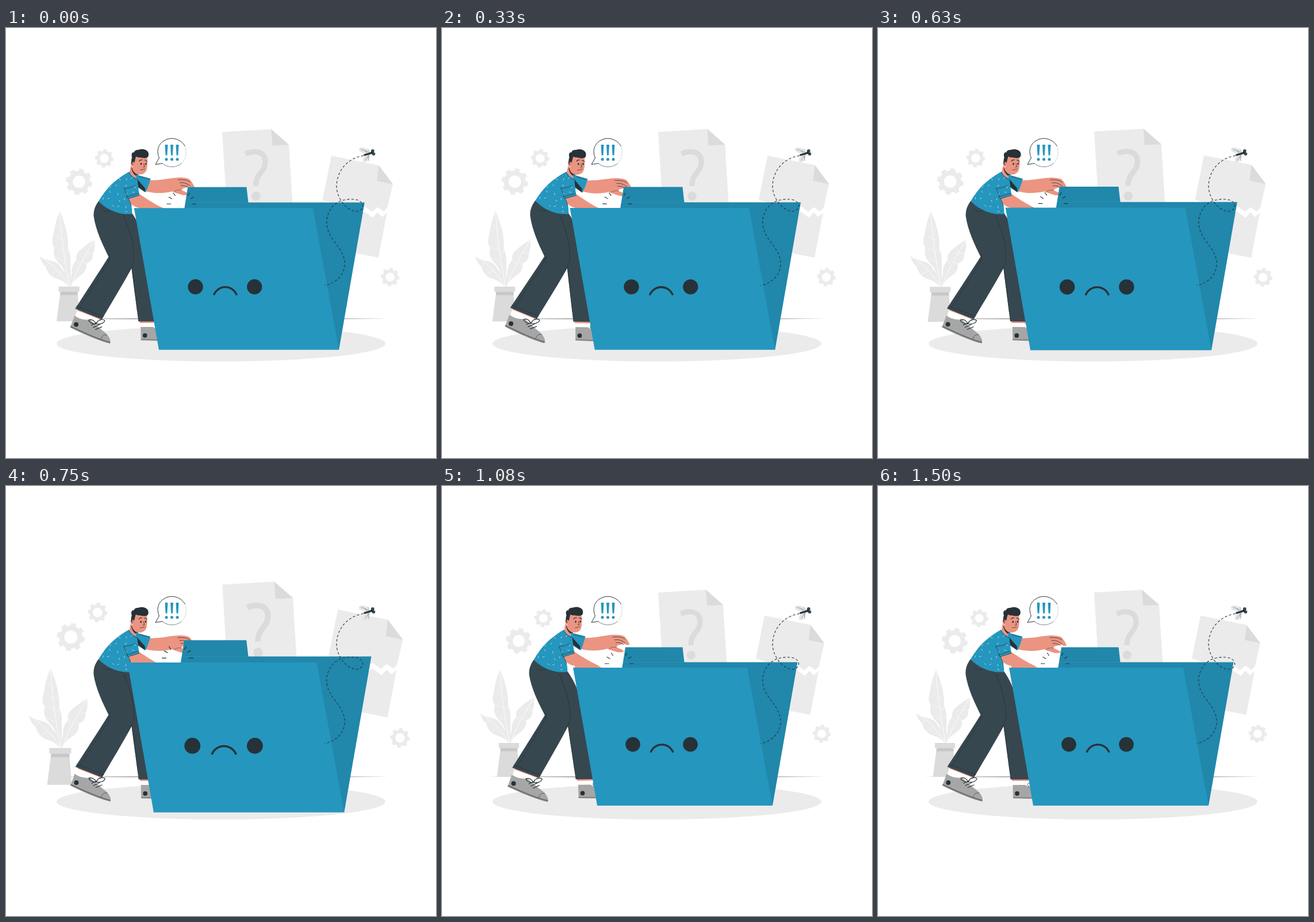
These frames come from a looping animation (748x748 px, 1540 ms). An HTML page:

```html
<!DOCTYPE html>
<html lang="en">
<head>
<meta charset="utf-8">
<title>Heavy folder</title>
<style>
html, body { margin: 0; width: 100%; height: 100%; overflow: hidden; background: #fff; }
svg { display: block; width: 100vw; height: 100vh; }
.ink { fill: none; stroke: #263238; stroke-linecap: round; stroke-linejoin: round; }
.vein { fill: none; stroke: #fff; }
.dark { fill: #263238; }
.pale { fill: #ebebeb; }
.mid { fill: #dbdbdb; }
.skin { fill: #eb9481; }
.blue { fill: #2596be; }
.pants { fill: #37474f; }
.white { fill: #fff; }
.shoe { fill: #a6a6a6; }
.sole { fill: #858585; }
</style>
</head>
<body>
<svg viewBox="0 0 748 748" stroke-width=".8" xmlns="http://www.w3.org/2000/svg">
  <path fill="#8a8a8a" d="M78 505.8 L220 505.2 H560 L666 505.8 L560 506.5 H220Z"/>

  <g id="backdrop">
    <g id="gears" class="pale" fill-rule="evenodd"></g>

    <path class="pale" d="M376 185.3 L459 180.5 L489 206.7 L501 400 L389 400Z"/>
    <path class="mid" d="M459 180.5 L461 208.3 L489 206.7Z"/>
    <path d="M415.5 222.5 C426 217 449 215 449 236 C449 254 432 256 433 277" fill="none" stroke="#dbdbdb" stroke-width="9"/>
    <circle class="mid" cx="433.3" cy="294" r="7.6"/>

    <path class="pale" d="M561 225.5 L641 241.5 L665 273.5 L656 313 L650 320 L639 312.5 L630 320.5 L617 311 L600 318 L546 300Z"/>
    <path class="mid" d="M641 241.5 L638 268 L665 273.5Z"/>
    <path class="pale" d="M655 322 L647 329.5 L639 321.5 L631 330.5 L617 320 L602 330 L590 388 L640.5 398Z"/>

    <path class="pale" d="M101 319.5 C94 335 92 348 90 360 C87 370 88 376 92 381 C88 394 94 402 102 410 C110 421 116 434 117.500 448 H119 C118.500 430 119.500 419 119 407 C120 396 118 390 115 383 C116 366 112 345 101 319.500Z"/>
    <path class="pale" d="M66 395 C70 406 73 410 77 413 C79 423 86 430 93 433 C104 436 112 441 117 448 C116 433 112 424 104 417 C101 409 95 406 88 404 C80 402 73 400 66 395Z"/>
    <path class="pale" d="M160 368 C150 373 143 379 137 384 C130 389 128 395 129 402 C122 410 121 417 121 425 C118 434 118 441 119 448 C123 437 131 432 139 426 C146 420 147 414 146 408 C154 405 158 399 157 391 C161 383 160 375 160 368Z"/>
    <path class="vein" d="M101 322 C103 360 109 405 118 447 M66 395 C88 408 105 426 117 447 M160 368 C145 392 128 420 120 447"/>
    <path class="vein" stroke-width=".5" d="M103 350 L96 342 M105 367 L94 360 M107 385 L94 381 M111 406 L96 399 M104 353 L110 346 M106 369 L114 363 M109 389 L117 386 M84 407 L77 411 M97 420 L85 426 M146 389 L157 391 M137 404 L146 408 M134 409 L129 402"/>
    <path class="mid" d="M102 456 H131 L135 506 H95.500Z"/>
    <path fill="#c7c7c7" d="M102 456 H131 L131.500 461.500 H101.600Z"/>
    <rect class="mid" x="99" y="447" width="35" height="9"/>
  </g>

  <ellipse class="pale" cx="374" cy="549" rx="286" ry="31"/>

  <g id="man">
    <!-- far leg -->
    <path class="skin" d="M233 509 H262 V515 H233Z"/>
    <path class="white" d="M233 513 H262 V524 H234Z"/>
    <path class="shoe" d="M234.500 520 L256 520 L280 534 V543.500 L235 542.500Z"/>
    <path class="sole" d="M235 541 L280 542 V544.300 L235 543.300Z"/>
    <circle class="dark" cx="242" cy="534.800" r="3.900"/>
    <path class="ink" d="M262 523 C258 517 262 515 266 519 M262 524 L272 521"/>
    <path class="pants" d="M204 324 L219 322 C228 335 236 350 242 375 L263 510.500 H230.500 C227 480 221 440 217.500 410Z"/>
    <!-- near leg -->
    <path class="skin" d="M126 488 L168 505 L164 509.500 L124 495Z"/>
    <path class="white" d="M124 491.500 L163 506.500 L157 515 L120 503Z"/>
    <path class="shoe" d="M119.500 500.500 C126 506 138 509 146 507 C153 514 164 523 174 531 C180 537 183 543 181.500 548.500 C168 546 128 529 112 521Z"/>
    <path class="sole" d="M112.500 519 C130 527 166 544 181.800 546.300 L181.300 548.700 C166 546 128 529.500 112 521Z"/>
    <path class="ink" stroke-width=".6" d="M113 519 C130 527 164 543 181 546.300 M166 541 C167 535 171 533 176 534"/>
    <circle class="dark" cx="122.300" cy="516" r="4"/>
    <path class="ink" stroke-width="1.200" d="M157 515 C147 515 141 508 146 507.500 C152 507 155 511 157 515 C159 507 169 506 172 509 C171 514 163 516 157 515 M149 517 L159 512.500 M152 521 L163 516 M156 524.500 L167 520"/>
    <path class="pants" d="M161 301 C154 311 152 318 152.500 328 C156 352 168 377 178.500 398 C161 426 140 458 120.500 488.500 L167 507 C185 476 204 445 219 417 C224 409 224 402 223 393 L220 324Z"/>
    <path class="ink" d="M205 327 C213 347 222 371 222.500 397 C223 409 219 415 214 424 M219 417 L229 494"/>
    <path class="ink" stroke-width=".7" d="M168 317 C173 320 178 320 182 318 M177 407 C181 403 182 399 179 393 M182 401 C163 432 146 460 128 487 M123 484 L170 502"/>

    <!-- far arm -->
    <path class="skin" d="M246 264.500 C264 266 283 261 299 260 C306 259.700 315 260.500 319 263 C323 267 326 272 328 277 C326 279.500 322 278 318 275.500 C315 277 311 278 307 279 L305 282 C311 284 315 286 318 289 C314 291.500 308 291 303 289 C298 287.500 293 286 289 284 C273 288 256 288 240 283Z"/>
    <path class="ink" d="M299 264 C308 263 315 264 320 268 M302 269 C309 268 314 270 320 274.500 M304 274 C309 273 314 275 318 277.500"/>
    <path class="ink" stroke-width=".5" d="M305 282 C300 281 296 282 293 284"/>
    <!-- neck and head -->
    <path class="skin" d="M217 239 L214 254 C218 261 224 266 229 266 L230 252Z"/>
    <path class="dark" d="M219 243 C220 249 224 254 230 254.800 L228.500 258 C222 256 219 250 218 244Z"/>
    <path class="skin" d="M221 222 C227 218 238 219 245 224 C246.500 232 246 241 244 248 C241 254 234 256 229 254.500 C224 252.500 221 246 220.500 241 C215 239 215 231 221 231Z"/>
    <path class="dark" d="M219.500 240 C217 235 217.500 229 219 225 C217 220 219 215 222.500 216.500 C223 213 227 211.500 230 212 C236 209.500 244 211 247 216 C248.500 219 248 223 246 225 C242 227 237 226 233 225 C230 225.500 228 224.500 226 223.500 C224 228 224 233 222.500 235 C221 230 218 233 219.500 240Z"/>
    <ellipse class="dark" cx="234.800" cy="236.300" rx="1.300" ry="1.900"/>
    <ellipse class="dark" cx="243" cy="236" rx="1.200" ry="1.900"/>
    <path class="ink" stroke-width="1.200" d="M231.500 231.500 C233 229.500 235 229 236.500 229.500 M241 229.700 C243 229.700 244 230.500 245 232"/>
    <path class="ink" d="M239.500 236 L241 241.500 L238.500 242 M233.500 247 C235 245 236.500 248 238 246 C239 244.500 240 247 241.500 245"/>
    <path class="ink" stroke-width=".6" d="M218.500 233 C220 234 220.500 236 220 238"/>
    <!-- shirt -->
    <path class="blue" d="M226 255 L251.500 262 C249 271 246 279 243 286 L228 277Z"/>
    <path class="dark" d="M228 263 L242 279 L241.500 285.500 L229.500 276Z"/>
    <path class="skin" d="M209 295 C215 306 222 311 232 313 L232 325 L290 325 L272 312.500 C258 306 244 297 231 288Z"/>
    <path class="blue" id="shirt" d="M214 250 C201 257 185 269 176 280 C169 288 164 296 161 301.500 C174 315 196 326 219 323.500 C220 312 217 305 213 297 L232 291 C230 280 229 270 228 261 C222 261 217 256 214 250Z"/>
    <clipPath id="cut"><use href="#shirt"/></clipPath>
    <path id="dashes" clip-path="url(#cut)" fill="none" stroke="#d6ebf3" stroke-linecap="round"/>
    <path class="ink" stroke-width=".7" d="M205 279 C208 285 210 291 212 297 L232 291 M205 279 C212 279 219 277 225 274 M209 294 L230.500 287.500 M213 297 C215 301 217 305 218 310"/>
    <path class="ink" stroke-width=".6" d="M214 251 C217 258 223 263 229 264 M232 258.500 C238 260 244 262 249 263"/>
  </g>

  <g id="folder">
    <path fill="#2187ab" d="M319 280.500 H418.500 L421.500 306.500 H618.500 L575 556 L313 318Z"/>
    <path d="M315 306.500 H421.500" stroke="#2596be"/>
    <path class="blue" d="M228 316 H531 L575 556 H270Z"/>
    <circle class="dark" cx="332" cy="449.500" r="12.800"/>
    <circle class="dark" cx="432" cy="449.500" r="12.800"/>
    <path d="M363 463.500 A20.800 20.800 0 0 1 402 463.500" fill="none" stroke="#263238" stroke-width="3.200"/>
    <path class="ink" stroke-width="1.100" d="M283.500 309 H290 M287 297.500 L292 300.300 M294.500 290.500 L297.500 295 M322 290.500 L319.500 295 M329 297 L324.500 300 M326.500 309 H333"/>
  </g>

  <path d="M622 222 C592 227 575 250 575 276 C576 300 596 319 610 319 C624 317 624 303 611 299 C592 295 573 301 564 316 C552 337 559 356 571 371 C583 387 590 398 589 412 C588 432 571 445 554 448" fill="none" stroke="#263238" stroke-width="1.100" stroke-dasharray="4.200 3.400"/>

  <g id="fly">
    <path fill="#e4e4e4" d="M634 217 C628 208 618 206 614 210 C613 216 624 220 634 217Z"/>
    <path fill="#e4e4e4" d="M633 219 C624 221 618 228 622 233 C628 235 635 227 633 219Z"/>
    <path class="ink" stroke-width=".4" d="M634 217 L618 211 M633 219 L625 230 M629 219 L625 214 M630 221 L631 231 M632 214 L629 210"/>
    <path d="M622.500 221.300 L637 217" stroke="#263238" stroke-width="3"/>
    <circle cx="637.800" cy="213.800" r="2.900" fill="#37474f"/>
    <circle cx="639.500" cy="219" r="2.800" fill="#37474f"/>
    <circle class="dark" cx="636.500" cy="217" r="2.400"/>
  </g>

  <g id="bubble">
    <path class="white" d="M260 237.300 L266.500 226 A25 25 0 1 1 272.500 235.800Z"/>
    <path class="ink" stroke-width="1" d="M272 235.600 L260 237.300 L266.500 226 C261 214 265 201 276 195.500 C289 188 305 194 311 205"/>
    <path class="ink" stroke-width=".6" d="M305 236 C296 243 282 244 272 235.600"/>
    <path class="ink" stroke-width=".5" stroke-dasharray="3 2" opacity=".5" d="M311 205 C315 214 314 227 305 236"/>
    <g id="marks" class="blue"></g>
  </g>
</svg>
<script>
const LOOP = 1540, FRAMES = 37;
const $ = id => document.getElementById(id);

function gear(cx, cy, r, hole, turn) {
  const teeth = 8, pts = [];
  const edge = [[-.3, .82], [-.22, 1], [.22, 1], [.3, .82]];
  for (let i = 0; i < teeth; i++) {
    for (const [off, k] of edge) {
      const a = turn + (i + off) / teeth * 2 * Math.PI;
      pts.push((cx + r * k * Math.cos(a)).toFixed(2) + ' ' + (cy + r * k * Math.sin(a)).toFixed(2));
    }
  }
  return `<path d="M${pts.join('L')}Z M${cx - hole} ${cy}a${hole} ${hole} 0 1 0 ${2 * hole} 0a${hole} ${hole} 0 1 0 ${-2 * hole} 0Z"/>`;
}

$('gears').innerHTML = gear(133.5, 269.5, 22.6, 10.5, .2)
  + gear(176.3, 230, 15.8, 7.6, .1) + gear(660.5, 431, 15.8, 7.6, .1);

$('marks').innerHTML = [279, 288.5, 298].map(x =>
  `<path d="M${x - 2.5} 203h5l-1.100 18.500h-2.800Z"/><circle cx="${x}" cy="228.600" r="2.500"/>`).join('');

// Short dashes scattered over the shirt on a jittered grid
let seed = 7;
const rnd = () => (seed = seed * 16807 % 2147483647) / 2147483647;
let dashes = '';
for (let y = 258; y < 324; y += 12) {
  for (let x = 166; x < 230; x += 13) {
    const a = rnd() * Math.PI, px = x + rnd() * 7, py = y + rnd() * 6;
    dashes += `M${px} ${py}l${2.8 * Math.cos(a)} ${2.8 * Math.sin(a)}`;
  }
}
$('dashes').setAttribute('d', dashes);

// Piecewise linear value from [position, value] stops
function track(stops, p) {
  let i = 1;
  while (i < stops.length - 1 && p > stops[i][0]) i++;
  const [a, u] = stops[i - 1], [b, v] = stops[i];
  return u + (v - u) * (p - a) / (b - a);
}

const beat = [[0, 1], [.1, 1.1], [.3, 1], [.4, 1], [.5, 1.1], [.6, 1], [1, 1]];
const sway = [[0, 0], [.25, 1], [.75, -1], [1, 0]];

const zoom = (id, s, x, y) =>
  $(id).setAttribute('transform', `translate(${x} ${y}) scale(${s}) translate(${-x} ${-y})`);

// The picture holds for one step, 24 steps a second
function draw(ms) {
  const k = Math.floor((ms % LOOP + 5) * FRAMES / LOOP);
  const p = (k + 1) % FRAMES / FRAMES;
  const s = track(beat, p);
  zoom('backdrop', s, 373, 346);
  zoom('folder', s, 421.5, 421);
  $('man').setAttribute('transform', `rotate(${track(sway, p)} 220 380)`);
}

let start;
function tick(now) {
  start ??= now;
  draw(now - start);
  requestAnimationFrame(tick);
}
draw(0);
requestAnimationFrame(tick);
</script>
</body>
</html>
```
